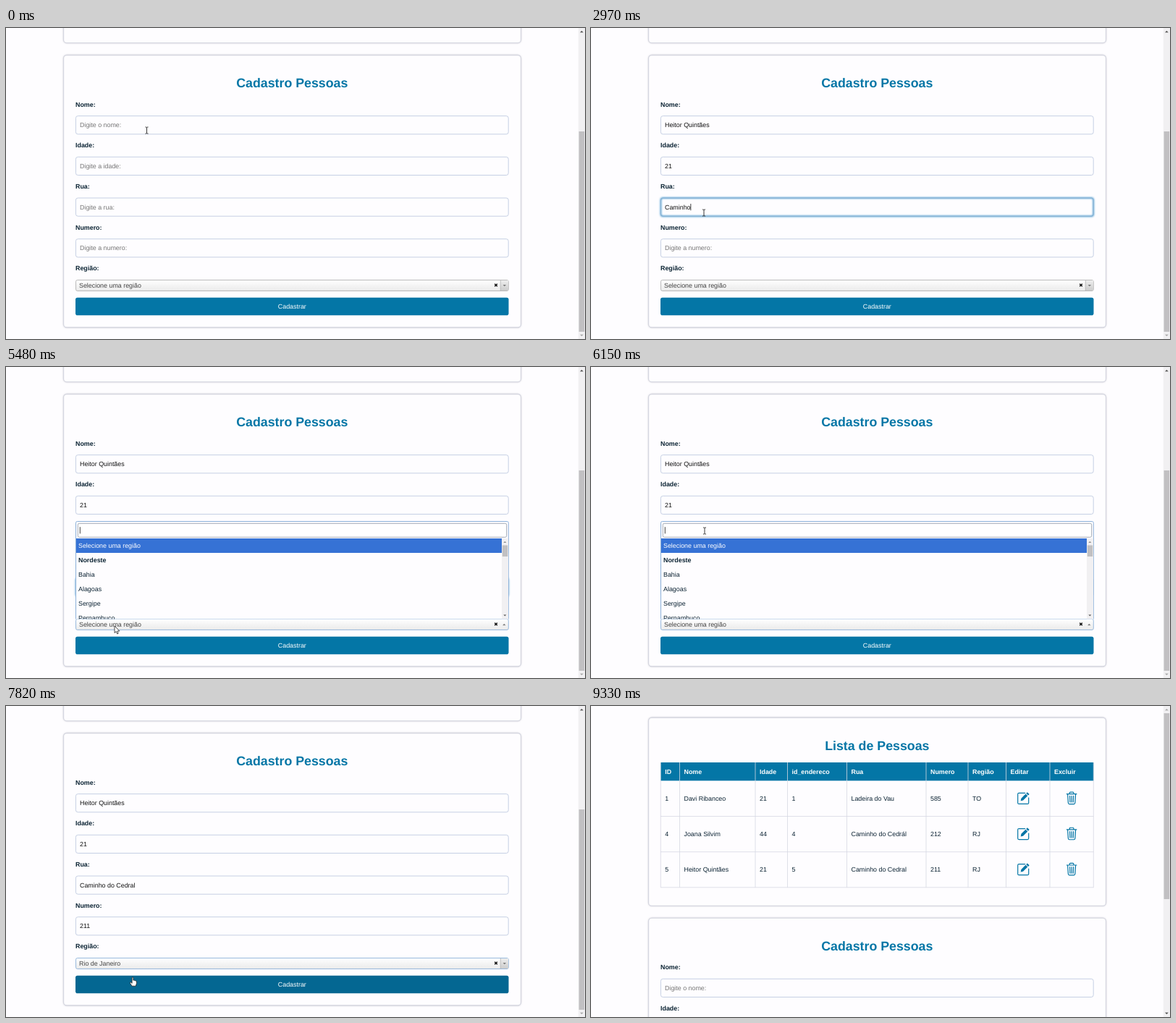
These frames come from a looping animation (800x430 px, 9360 ms). An HTML page:

```html
<!DOCTYPE html>
<html lang="pt-BR">
<head>
<meta charset="utf-8">
<title>Cadastro Pessoas</title>
<style>
html, body { margin: 0; width: 100%; height: 100%; overflow: hidden; background: #fefdff; }
svg { display: block; width: 800px; height: 430px; }
text { font: 8.9px "Liberation Sans", Arial, sans-serif; fill: #0b2333; white-space: pre; text-rendering: geometricPrecision; }
.b { font-weight: bold; }
.h { font-size: 17.8px; font-weight: bold; fill: #0476a6; text-anchor: middle; }
.w { fill: #fff; }
.mid { text-anchor: middle; }
.sel { fill: #444; }
.card { fill: #fefdff; stroke: #d5d6e0; stroke-width: 1.3; filter: drop-shadow(0 .6px 1.2px #00002022); }
.input { fill: #fefdff; stroke: #c6d0e4; stroke-width: 1; }
.icon { fill: none; stroke: #0476a6; stroke-width: 1.2; stroke-linejoin: round; stroke-linecap: round; }
</style>
</head>
<body>
<svg id="stage" viewBox="0 0 800 430"></svg>
<script>
const LOOP = 9360, SCROLL = 255.7, RELOAD = 8120;
const OPEN = 5450, PICK = 7140, PITCH = 56.7;
const PERSON = 'Heitor Quintães', STREET = 'Caminho do Cedral';

// bursts: [text, first key, last key]; focus: [start, end]
const fields = [
  { label: 'Nome:', hint: 'Digite o nome:', focus: [270, 2150], bursts: [[PERSON, 640, 1880]] },
  { label: 'Idade:', hint: 'Digite a idade:', focus: [2150, 2470], bursts: [['21', 2250, 2310]] },
  { label: 'Rua:', hint: 'Digite a rua:', focus: [2470, 4350],
    bursts: [[STREET.slice(0, 7), 2760, 2970], [STREET.slice(7), 3120, 3730]] },
  { label: 'Numero:', hint: 'Digite a numero:', focus: [4350, OPEN], bursts: [['21', 4730, 4790], ['1', 4940, 4940]] }
];
const query = [['rio de', 6330, 6700]];

const regions = {
  Nordeste: 'Bahia,Alagoas,Sergipe,Pernambuco,Paraíba,Rio Grande do Norte,Ceará,Piauí,Maranhão',
  Norte: 'Acre,Amapá,Amazonas,Pará,Rondônia,Roraima,Tocantins',
  'Centro-Oeste': 'Distrito Federal,Goiás,Mato Grosso,Mato Grosso do Sul',
  Sudeste: 'Espírito Santo,Minas Gerais,Rio de Janeiro,São Paulo',
  Sul: 'Paraná,Rio Grande do Sul,Santa Catarina'
};
const EMPTY = 'Selecione uma região';

const path = [
  [0, 194.5, 141.5], [30, 194.5, 141.5], [240, 186, 137], [1940, 186, 137], [2030, 177.5, 168],
  [2130, 165, 193], [2320, 165, 193], [2450, 156, 255.5], [4120, 156, 255.5], [4320, 154, 312.5],
  [5000, 154, 312.5], [5350, 150, 358], [5880, 150, 358], [6150, 157, 226.5], [6800, 157, 226.5],
  [7080, 160, 338], [7200, 160, 338], [7730, 170, 371], [7820, 175, 375], [8100, 176, 377],
  [8670, 58, 372], [9000, 56, 398], [9310, 55, 433]
];

const cols = [96.3, 122.5, 227, 271.5, 353.5, 463, 521, 573.5, 634, 694.3];
const heads = ['ID', 'Nome', 'Idade', 'id_endereco', 'Rua', 'Numero', 'Região', 'Editar', 'Excluir'];
const people = [
  ['1', 'Davi Ribanceo', '21', '1', 'Ladeira do Vau', '585', 'TO'],
  ['4', 'Joana Silvim', '44', '4', 'Caminho do Cedrál', '212', 'RJ'],
  ['5', PERSON, '21', '5', STREET, '211', 'RJ']
];

const text = (s, x, y, cls = '', id = '') => `<text x="${x}" y="${y}" class="${cls}" id="${id}">${s}</text>`;
const rect = (x, y, w, h, attrs = '') => `<rect x="${x}" y="${y}" width="${w}" height="${h}" ${attrs}/>`;
const tri = (x, y, r, up, fill, id = '') =>
  `<path id="${id}" d="M${x - r} ${y + (up ? r / 2 : -r / 2)}h${2 * r}l${-r} ${up ? -r : r}z" fill="${fill}"/>`;

const pencil = `<path class="icon" d="M11 1.5H2.5Q1 1.5 1 3V15Q1 16.5 2.5 16.5H14.5Q16 16.5 16 15V8"/>
  <path d="M14.2 .3L17 3 15.3 4.7 12.5 1.9ZM11.8 2.6L14.6 5.4 8.3 11.6 5 12.4 5.7 8.8Z" fill="#0476a6"/>`;
const trash = `<path class="icon" d="M.7 3.3H14.3M4.7 3V1.7Q4.7 .7 5.7 .7H9.3Q10.3 .7 10.3 1.7V3M2 3.5L2.8 15.6Q3 17.2 4.3 17.2H10.7Q12 17.2 12.2 15.6L13 3.5M5 6L5.3 14.5M7.5 6V14.5M10 6L9.7 14.5"/>`;

function listCard() {
  let s = rect(79.5, 16, 632, 260.4, 'rx="4.5" class="card"') + text('Lista de Pessoas', 395.3, 61.4, 'h');
  s += rect(96, 78, 598.5, 25.3, 'fill="#0476a6"');
  heads.forEach((h, i) => s += text(h, cols[i] + 6, 93.7, 'b w'));
  people.forEach((row, r) => {
    const y = 103.4 + r * 49.15;
    row.forEach((v, i) => s += text(v, cols[i] + 6, y + 27.6));
    s += `<g transform="translate(588.7 ${y + 15.5})">${pencil}</g><g transform="translate(656.6 ${y + 15})">${trash}</g>`;
  });
  const lines = cols.map(x => `M${x} 78V250.8`).join('') + [1, 2, 3].map(i => `M96 ${103.4 + i * 49.15}H694.6`).join('');
  return s + `<path d="${lines}" stroke="#d6d9e2" stroke-width=".8"/>`;
}

function formCard() {
  let s = rect(79.5, 37.5, 632, 376.5, 'rx="4.5" class="card"') + text('Cadastro Pessoas', 395.3, 82.3, 'h');
  fields.forEach((f, i) => {
    const y = 121.6 + i * PITCH;
    s += text(f.label, 96, y - 13.1, 'b') + rect(96.4, y, 597.8, 25.2, 'rx="3" class="input"');
    s += `<g id="glow${i}" fill="none">${rect(96.4, y, 597.8, 25.2, 'rx="3" stroke="#5fa8d8" stroke-width="2" filter="url(#soft)"')}
      ${rect(96.4, y, 597.8, 25.2, 'rx="3" stroke="#8ab2d2"')}</g>`;
    s += text('', 102, y + 15.5, '', 'val' + i);
  });
  s += text('Região:', 96, 335.3, 'b');
  s += rect(96.5, 348.5, 597.8, 15, 'rx="2.2" fill="url(#face)" stroke="#aaa" stroke-width=".8" id="box"');
  s += `<g id="arrow">${rect(683.5, 349, 10.4, 14, 'fill="url(#knob)"')}<path d="M683.3 348.8V363.2" stroke="#aaa" stroke-width=".7"/>
    ${tri(688.8, 356.2, 2.2, false, '#777')}</g>`;
  s += `<g id="arrowUp">${tri(688.3, 356.2, 2.2, true, '#777')}</g>`;
  s += text(EMPTY, 101, 359.3, 'sel', 'choice');
  s += '<path d="M675.2 353.7l3.6 3.6m0-3.6l-3.6 3.6" stroke="#111" stroke-width="1.5"/>';
  s += rect(96, 372.8, 598.5, 24.4, 'rx="2.8" id="button"') + text('Cadastrar', 395.3, 387.8, 'w mid');
  return s;
}

const dropdown = `<g id="drop">
  <path id="panel" fill="#fefdff" stroke="#7fa9d6" stroke-width=".9"/>
  <g id="searchBox">${rect(99.3, 216.3, 592.4, 19, 'rx="2" fill="#fff" stroke="#9aa3ad" stroke-width=".9"')}${text('', 102, 229, '', 'search')}</g>
  <g id="rows" clip-path="url(#listClip)"></g></g>`;

const pointers = `<g id="mouse">
  <path id="arrowPtr" d="M0 0V9.6L2.2 7.6 3.7 11 5.2 10.3 3.8 7.1H6.8Z" fill="#fff" stroke="#222" stroke-width=".8"/>
  <path id="beamPtr" d="M-2-4.5H-.5L0-4 .5-4.5H2M0-4V4M-2 4.5H-.5L0 4 .5 4.5H2" fill="none" stroke="#222" stroke-width=".9"/>
  <path id="handPtr" d="M-.9 .4Q0-.6 .9 .4V4.3Q1.8 3.6 2.6 4.6 3.5 4.1 4.1 5.1 5.2 4.8 5.4 6V8.6L4.3 12.2H-.9L-3.6 8.2Q-3.8 6.8-2.4 7L-.9 8.4Z" fill="#fff" stroke="#222" stroke-width=".8"/></g>`;

document.getElementById('stage').innerHTML = `<defs>
  <filter id="soft" x="-5%" y="-50%" width="110%" height="200%"><feGaussianBlur stdDeviation="1.3"/></filter>
  <linearGradient id="face" x2="0" y2="1"><stop offset="0" stop-color="#fff"/><stop offset="1" stop-color="#eaeaea"/></linearGradient>
  <linearGradient id="knob" x2="0" y2="1"><stop offset="0" stop-color="#eee"/><stop offset="1" stop-color="#ccc"/></linearGradient>
  <clipPath id="listClip">${rect(97, 237, 597, 111.5)}</clipPath></defs>
  ${rect(0, 0, 800, 430, 'fill="#fefdff"')}
  <g id="page">${listCard()}<g transform="translate(0 ${SCROLL})">${formCard()}</g></g>${dropdown}
  <path id="caret" stroke="#111" stroke-width=".8"/>
  ${rect(790.8, 0, 9.2, 430, 'fill="#f1f0f2"')}${rect(791.6, 0, 7.6, 0, 'fill="#c1c0c2" id="thumb"')}
  ${tri(795.4, 5, 2.4, true, '#555', 'upTip')}${tri(795.4, 425, 2.4, false, '#555', 'downTip')}${pointers}`;

const $ = id => document.getElementById(id);
const set = (id, attrs) => { for (const k in attrs) $(id).setAttribute(k, attrs[k]); };
const show = (id, on) => set(id, { visibility: on ? 'visible' : 'hidden' });
const clamp = v => Math.max(0, Math.min(1, v));

function typed(bursts, t) {
  return bursts.map(([s, a, b]) =>
    t < a ? '' : s.slice(0, 1 + Math.floor(clamp((t - a) / (b - a || 1)) * (s.length - 1)))).join('');
}

function lastKey(bursts, start, t) {
  let last = start;
  for (const [s, a, b] of bursts) if (t >= a) last = Math.min(t, b);
  return last;
}

function mouseAt(t) {
  let i = 1;
  while (i < path.length - 1 && path[i][0] < t) i++;
  const [a, x, y] = path[i - 1], [b, u, v] = path[i];
  const k = clamp((t - a) / (b - a)), e = k * k * (3 - 2 * k);
  return [x + (u - x) * e, y + (v - y) * e];
}

function matches(q) {
  const hit = s => s.toLowerCase().includes(q);
  const out = hit(EMPTY.toLowerCase()) ? [{ s: EMPTY }] : [];
  for (const head in regions) {
    const found = regions[head].split(',').filter(hit);
    if (found.length) out.push({ s: head, head: true }, ...found.map(s => ({ s })));
  }
  return out;
}

function mark(s, q) {
  const i = q ? s.toLowerCase().indexOf(q) : -1, n = i + q.length;
  return i < 0 ? s : `${s.slice(0, i)}<tspan text-decoration="underline">${s.slice(i, n)}</tspan>${s.slice(n)}`;
}

function drawCaret(id, bursts, start, t, y) {
  const on = Math.floor((t - lastKey(bursts, start, t)) / 150) % 2 === 0;
  const x = 102.3 + (typed(bursts, t) ? $(id).getComputedTextLength() : 0);
  set('caret', { d: on ? `M${x} ${y - 4.6}v9.2` : '' });
}

let listKey = '';
function drawList(q) {
  const rows = matches(q), full = rows.length * 20, h = Math.min(111.5, full), dy = 111.5 - h;
  set('panel', { d: `M96.5 348.5V${215.5 + dy}q0-2 2-2H692.3q2 0 2 2V348.5` });
  set('searchBox', { transform: `translate(0 ${dy})` });
  if (q !== listKey || !$('rows').firstChild) {
    listKey = q;
    const scrolls = full > 112, pick = rows.findIndex(r => !r.head);
    let s = '';
    rows.slice(0, 6).forEach((r, i) => {
      const y = 237 + dy + i * 20;
      if (i === pick) s += rect(97, y, scrolls ? 588 : 597, 20, 'fill="#3672d5"');
      s += text(r.head ? r.s : mark(r.s, q), 100, y + 13, r.head ? 'b' : i === pick ? 'w' : '');
    });
    if (scrolls) {
      s += rect(685, 237, 9, 111.5, 'fill="#f1f0f2"') + rect(685.8, 246.5, 7.4, 92 * 111.5 / full, 'fill="#c1c0c2"');
      s += tri(689.3, 242, 2, true, '#888') + tri(689.3, 343.5, 2, false, '#555');
    }
    $('rows').innerHTML = s;
  }
  return dy;
}

function pointerKind(x, y, open, dy, fresh) {
  if (x < 96 || x > 694) return 'arrow';
  if (open && y > 213 + dy && y < 348) return y < 236 + dy ? 'beam' : 'hand';
  const fy = y - (fresh ? SCROLL : 0);
  if (fy > 373 && fy < 397) return 'hand';
  return fy > 121.5 && fy < 318 && (fy - 121.5) % PITCH < 25.5 ? 'beam' : 'arrow';
}

function draw(now) {
  const t = now % LOOP, fresh = t >= RELOAD, ft = fresh ? 0 : t;
  const open = ft >= OPEN && ft < PICK;
  set('page', { transform: `translate(0 ${fresh ? 0 : -SCROLL})` });
  set('caret', { d: '' });

  fields.forEach((f, i) => {
    const [a, b] = f.focus, s = typed(f.bursts, ft), id = 'val' + i;
    $(id).textContent = s || f.hint;
    $(id).style.fill = s ? '#111' : '#757575';
    set('glow' + i, { opacity: clamp((ft - a) / 120) * (1 - clamp((ft - b) / 120)) });
    if (ft >= a && ft < b) drawCaret(id, f.bursts, a, ft, 134.2 + i * PITCH);
  });

  $('choice').textContent = ft >= PICK ? 'Rio de Janeiro' : EMPTY;
  set('box', { stroke: ft >= OPEN ? '#7fa9d6' : '#aaa' });
  show('arrow', !open);
  show('arrowUp', open);
  show('drop', open);
  let dy = 0;
  if (open) {
    const q = typed(query, ft);
    dy = drawList(q);
    $('search').textContent = q;
    drawCaret('search', query, OPEN, ft, 225.8 + dy);
  }

  const k = clamp((ft - 7750) / 60);
  set('button', { fill: `rgb(4,${118 - 15 * k},${166 - 20 * k})` });
  set('thumb', fresh ? { y: 10, height: 257 } : { y: 143, height: 277 });
  set('upTip', { fill: fresh ? '#aaa' : '#555' });
  set('downTip', { fill: fresh ? '#555' : '#aaa' });

  const [x, y] = mouseAt(t), kind = pointerKind(x, y, open, dy, fresh);
  set('mouse', { transform: `translate(${x} ${y})` });
  for (const p of ['arrow', 'beam', 'hand']) show(p + 'Ptr', p === kind);
}

const start = performance.now();
function tick() {
  draw(performance.now() - start);
  requestAnimationFrame(tick);
}
tick();
</script>
</body>
</html>
```
